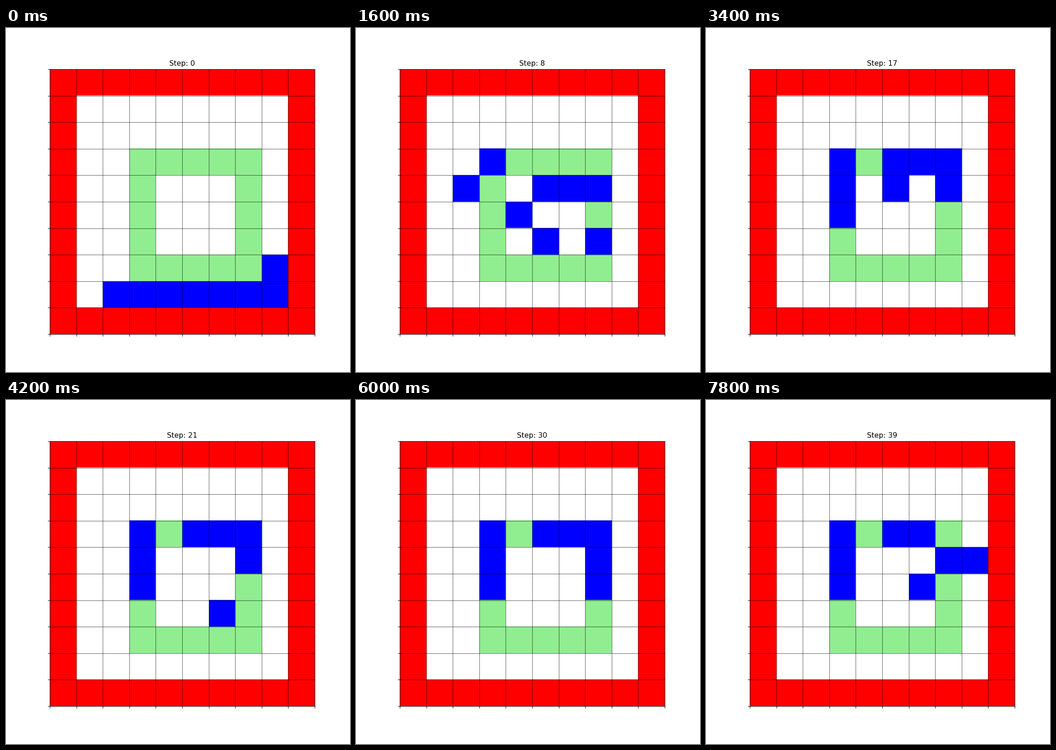
Animation of 748 by 748 pixels, one loop 8000 ms. Source, as a matplotlib script:

```python
import numpy as np
import matplotlib.pyplot as plt
from matplotlib.animation import FuncAnimation

STAGE = 748
UNITS = 800            # layout units across the square stage
LEFT, TOP, RIGHT, BOTTOM = 102, 96, 718, 712
SIZE = 10
CELL = (RIGHT - LEFT) / SIZE
PT = UNITS / 8 / 72    # one point in layout units
STEPS = 40

EMPTY, WALL, GOAL, AGENT = range(4)
PALETTE = np.array([(255, 255, 255), (255, 0, 0), (144, 238, 144),
                    (0, 0, 255)], dtype=np.uint8)
MOVES = {"U": (-1, 0), "D": (1, 0), "L": (0, -1), "R": (0, 1), ".": (0, 0)}

# Start cell (row, column) and one move per step; agents rest afterwards.
AGENTS = [
    ((8, 2), "UUUR.UU"),
    ((8, 3), "U.U..LUUR"),
    ((8, 4), "UUU......L"),
    ((8, 5), "UUUUL..R....U"),
    ((8, 6), "UUUU.....R.....U" + "." * 20 + "D"),
    ((8, 7), ".LLU...U..R..ULU..DDRRULLUDRR.RUU....D"),
    ((8, 8), "ULU.......U.....U" + "." * 18 + "LLDR"),
    ((7, 8), "UUUL....R...ULL"),
]

index = np.arange(SIZE + 1)
col_edges = np.rint(LEFT + CELL * index).astype(int)
# The rows are stretched by one unit upwards and clipped at the frame.
row_edges = np.rint(BOTTOM - (CELL + 0.1) * (SIZE - index)).astype(int)
row_edges[0] = TOP
col_lines = np.rint(LEFT + CELL * index) + 0.5
row_lines = np.rint(TOP + CELL * index) + 0.5


def make_room():
    room = np.full((SIZE, SIZE), WALL)
    room[1:-1, 1:-1] = EMPTY
    room[3:8, 3:8] = GOAL
    room[4:7, 4:7] = EMPTY
    return room


def cell_at(start, path, step):
    row, col = start
    for move in path[:step]:
        dr, dc = MOVES[move]
        row, col = row + dr, col + dc
    return row, col


def picture(step):
    grid = make_room()
    for start, path in AGENTS:
        grid[cell_at(start, path, step)] = AGENT
    cells = np.repeat(grid, np.diff(row_edges), axis=0)
    cells = np.repeat(cells, np.diff(col_edges), axis=1)
    canvas = np.full((UNITS, UNITS), EMPTY)
    canvas[TOP:BOTTOM, LEFT:RIGHT] = cells
    return PALETTE[canvas]


def rule(draw, at, start, end, width):
    draw(at, start, end, colors="black", linewidth=width, snap=False)


fig = plt.figure(figsize=(8, 8), dpi=STAGE / 8)
ax = fig.add_axes([0, 0, 1, 1])
image = ax.imshow(picture(0), extent=(0, UNITS, UNITS, 0), aspect="auto",
                  interpolation="bilinear")

# Grid, frame and tick marks
x0, x1 = col_lines[[0, -1]]
y0, y1 = row_lines[[0, -1]]
tick = 3.5 * PT
rule(ax.hlines, row_lines[1:-1], x0, x1, 0.5)
rule(ax.vlines, col_lines[1:-1], y0, y1, 0.5)
rule(ax.hlines, [y0, y1], x0 - 0.5, x1 + 0.5, 0.8)
rule(ax.vlines, [x0, x1], y0 - 0.5, y1 + 0.5, 0.8)
rule(ax.hlines, row_lines, x0 - tick, x0, 0.8)
rule(ax.vlines, col_lines, y1, y1 + tick, 0.8)

title = ax.text((LEFT + RIGHT) / 2, TOP - 6 * PT, "Step: 0", fontsize=12,
                ha="center", va="baseline")
ax.set(xlim=(0, UNITS), ylim=(UNITS, 0))
ax.axis("off")


def update(step):
    image.set_data(picture(step))
    title.set_text(f"Step: {step}")
    return image, title


anim = FuncAnimation(fig, update, frames=STEPS, interval=200,
                     repeat=True, repeat_delay=0, blit=False)
plt.show()
```
